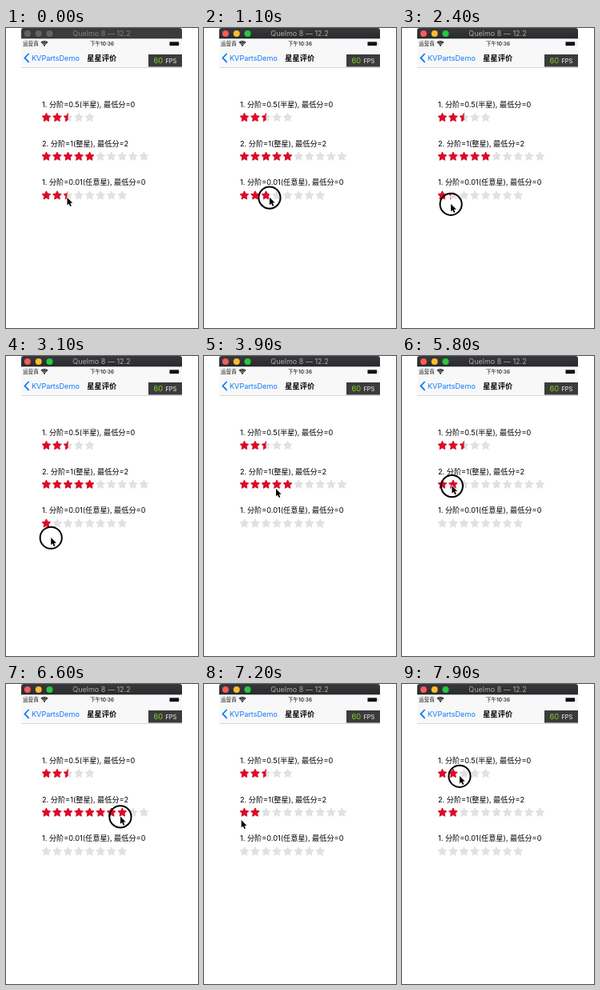
Animation of 240x375 px, one loop 8000 ms. Source, as an HTML page with a canvas:

```html
<!DOCTYPE html>
<html lang="zh-CN">
<head>
<meta charset="utf-8">
<style>
  html, body { margin: 0; width: 100%; height: 100%; overflow: hidden; background: #fff; }
  canvas { display: block; }
</style>
</head>
<body>
<canvas width="240" height="375"></canvas>
<script>
const ctx = document.querySelector('canvas').getContext('2d');
const FONT = 'Inter, "Noto Sans CJK SC", "Noto Sans CJK", sans-serif';
const LOOP = 8000, STEP = 100, ACTIVATE = 300;
const LEFT = 44, PITCH = 13.55;
const BLUE = '#0a7aff', RED = '#dc0a28', GREY = '#e1e1e2';

// Turning points of the pointer (time, x, y), eased in between
const turns = [
  [0, 76.5, 212], [900, 110, 208], [1280, 58, 215], [2280, 53, 219], [2700, 94, 224],
  [3300, 43, 228], [3900, 90, 166], [4200, 123, 160], [4600, 130, 163], [5650, 54, 162],
  [6480, 152, 165], [7150, 45, 172], [7600, 94, 116], [7900, 72, 115]
];

const rows = [
  { label: '1. 分阶=0.5(半星), 最低分=0', count: 5, min: 0, initial: 2.5,
    press: 7600, release: LOOP, snap: v => Math.round(v * 2) / 2 },
  { label: '2. 分阶=1(整星), 最低分=2', count: 10, min: 2, initial: 5,
    press: 4200, release: 7200, snap: Math.ceil },
  { label: '1. 分阶=0.01(任意星), 最低分=0', count: 8, min: 0, initial: 2.42,
    press: ACTIVATE, release: 3400, snap: v => Math.round(v * 100) / 100 }
];

function pointerAt(t) {
  const i = Math.max(1, turns.findIndex(p => p[0] >= t));
  const [t0, x0, y0] = turns[i - 1], [t1, x1, y1] = turns[i];
  const k = (t - t0) / (t1 - t0), ease = k * k * (3 - 2 * k);
  return { x: x0 + (x1 - x0) * ease, y: y0 + (y1 - y0) * ease };
}

function scoreAt(row, t) {
  if (t < row.press) return row.initial;
  // The last row is released at its low end, past the first star
  const { x } = pointerAt(Math.min(t, row.release - STEP));
  return Math.min(row.count, Math.max(row.min, row.snap((x - LEFT) / PITCH)));
}

function rect(x, y, w, h, color) {
  ctx.fillStyle = color;
  ctx.fillRect(x, y, w, h);
}

function disc(x, y, r, color) {
  ctx.fillStyle = color;
  ctx.beginPath();
  ctx.arc(x, y, r, 0, 7);
  ctx.fill();
}

function arc(x, y, r, from, to, width, color) {
  ctx.strokeStyle = color;
  ctx.lineWidth = width;
  ctx.beginPath();
  ctx.arc(x, y, r, from * Math.PI, to * Math.PI);
  ctx.stroke();
}

function text(s, x, y, size, color, align = 'left', weight = 400) {
  ctx.font = `${weight} ${size}px ${FONT}`;
  ctx.textAlign = align;
  ctx.fillStyle = color;
  ctx.fillText(s, x, y);
}

function star(x, y, color) {
  ctx.beginPath();
  for (let i = 0; i < 10; i++) {
    const r = i % 2 ? 2.8 : 5.6, a = (i / 5 - 0.5) * Math.PI;
    ctx.lineTo(x + r * Math.cos(a), y + r * Math.sin(a));
  }
  ctx.closePath();
  ctx.fillStyle = ctx.strokeStyle = color;
  ctx.lineWidth = 1;
  ctx.lineJoin = 'round';
  ctx.fill();
  ctx.stroke();
}

function drawRow(row, index, t) {
  const y = 112 + index * 48.7;
  const score = scoreAt(row, t);
  text(row.label, 45, y - 13, 9.16, '#000');
  for (let i = 0; i < row.count; i++) {
    const x = 50.4 + i * PITCH;
    const part = Math.min(1, Math.max(0, score - i));
    star(x, y, GREY);
    if (!part) continue;
    ctx.save();
    ctx.beginPath();
    ctx.rect(x - 6.5, y - 7, 13 * part, 14);
    ctx.clip();
    star(x, y, RED);
    ctx.restore();
  }
}

function drawWindowBar(active) {
  const shade = ctx.createLinearGradient(0, 0, 0, 14);
  shade.addColorStop(0, active ? '#38393c' : '#3b3b3d');
  shade.addColorStop(1, active ? '#28292c' : '#3b3b3d');
  ctx.fillStyle = shade;
  ctx.beginPath();
  ctx.roundRect(19, 0, 201, 13.6, [3, 3, 0, 0]);
  ctx.fill();
  ['#fc5b57', '#fdbc2e', '#29c83f'].forEach((c, i) =>
    disc(26.9 + i * 13.8, 7, 4, active ? c : '#646365'));
  text('Quelmo 8 — 12.2', 119.5, 10.3, 9, active ? '#aaaaac' : '#807f81', 'center');
}

function drawHeader() {
  rect(19, 13.6, 201, 35.4, '#f8f8f8');
  rect(19, 49, 201, 0.6, '#bdbdbf');
  text('运营商', 21, 22.3, 6.6, '#111');
  text('下午10:36', 120, 22.3, 6.5, '#111', 'center', 500);

  for (const r of [2.6, 4.4, 6]) arc(48, 22.5, r, -0.75, -0.25, 1.1, '#111');
  disc(48, 21.8, 1, '#111');
  rect(204.5, 17.3, 11.5, 4.8, '#111');
  rect(216.6, 18.8, 0.8, 1.7, '#888');

  ctx.strokeStyle = BLUE;
  ctx.lineWidth = 1.8;
  ctx.lineJoin = 'miter';
  ctx.beginPath();
  for (const side of [-1, 0, 1]) ctx.lineTo(23.4 + 5.2 * Math.abs(side), 37.4 + 5.4 * side);
  ctx.stroke();
  text('KVPartsDemo', 32, 40.7, 9.1, BLUE);
  text('星星评价', 119.7, 40.7, 9.2, '#000', 'center', 700);

  rect(178, 33, 42, 15.5, '#3b3b3c');
  text('60', 184.5, 44.3, 9.3, '#86d31f');
  text('FPS', 199.5, 44.3, 7.4, '#fff');
}

function drawPointer({ x, y }, pressed) {
  if (pressed) arc(x, y + 0.3, 13.6, 0, 2, 2, '#000');
  const arrow = new Path2D('M0 0V9.4L2.1 7.4 3.7 11 5.3 10.3 3.8 6.8H6.7Z');
  ctx.save();
  ctx.translate(x, y);
  ctx.lineJoin = 'round';
  ctx.lineWidth = 1.4;
  ctx.strokeStyle = '#fff';
  ctx.stroke(arrow);
  ctx.fillStyle = '#000';
  ctx.fill(arrow);
  ctx.restore();
}

function draw(now) {
  const t = Math.floor((now % LOOP) / STEP) * STEP;
  rect(0, 0, 240, 375, '#fff');
  drawWindowBar(t >= ACTIVATE);
  drawHeader();
  rows.forEach((row, i) => drawRow(row, i, t));
  drawPointer(pointerAt(t), rows.some(r => t >= r.press && t < r.release));
  requestAnimationFrame(draw);
}
requestAnimationFrame(draw);
</script>
</body>
</html>
```
